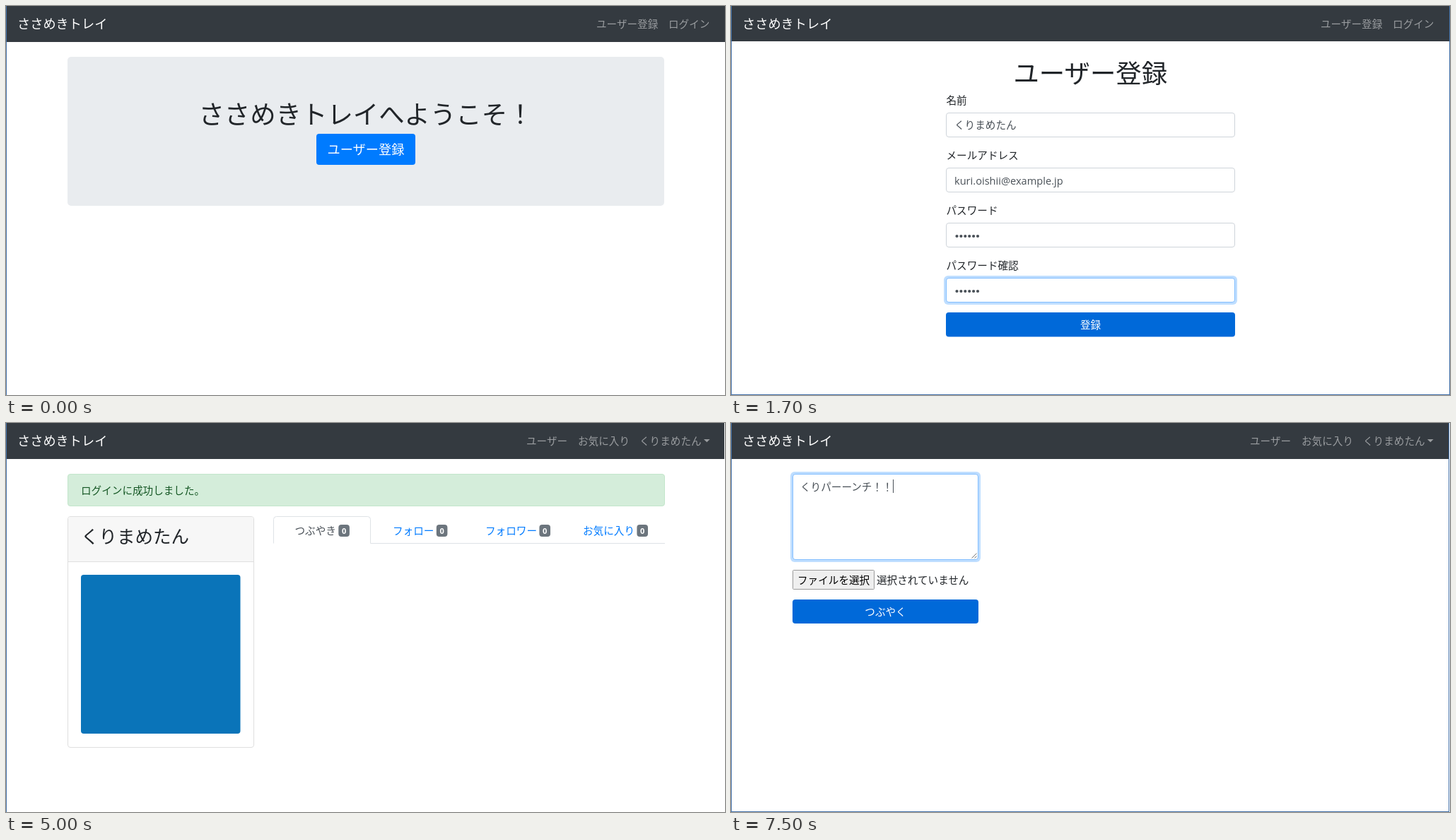
An HTML page that plays this animation: 1017x551 px, repeating every 8000 ms.

```html
<!DOCTYPE html>
<html lang="ja">
<head>
<meta charset="utf-8">
<title>ささめきトレイ</title>
<style>
  html, body { margin: 0; width: 100%; height: 100%; overflow: hidden; background: #fff; }
  svg { display: block; width: 1017px; height: 551px; }
  text { font-family: "Noto Sans CJK JP", "Noto Sans CJK", sans-serif; font-weight: 350; white-space: pre; }
  .latin { font-family: "Open Sans", "Noto Sans", sans-serif; font-weight: 400; }
  .bold { font-weight: 700; }
</style>
</head>
<body>
<svg id="stage" viewBox="0 0 1017 551" xmlns="http://www.w3.org/2000/svg"></svg>
<script>
const APP = 'ささめきトレイ';
const USER = 'くりまめたん';
const MAIL = 'kuri.oishii@example.jp';
const BASE = 14.6, TITLE = 36.4;
const INK = '#212529', GRAY = '#495057', LINK = '#007bff', MUTED = '#999c9f', EDGE = '#4472aa';

const stage = document.getElementById('stage');
let layer;

function add(tag, attrs, content) {
  const node = document.createElementNS(stage.namespaceURI, tag);
  for (const key in attrs) node.setAttribute(key, attrs[key]);
  if (content) node.textContent = content;
  layer.appendChild(node);
  return node;
}

// Full-width text, placed by the middle of its line
function text(x, mid, content, fill = INK, size = BASE, anchor = 'start') {
  add('text', { x, y: mid + size * 0.38, fill, 'font-size': size, 'text-anchor': anchor }, content);
}

const centered = (x, mid, content, fill, size) => text(x, mid, content, fill, size, 'middle');
const path = (d, attrs) => add('path', { d, fill: 'none', ...attrs });

function box(x, y, width, height, fill, rx = 0) {
  add('rect', { x, y, width, height, fill, rx });
}

function frame(x, y, width, height, fill, stroke, rx = 3.5) {
  add('rect', { x: x + 0.5, y: y + 0.5, width: width - 1, height: height - 1, fill, stroke, rx });
}

function field(x, y, width, height, focused) {
  if (focused) box(x - 3, y - 3, width + 6, height + 6, '#bfdeff', 6);
  frame(x, y, width, height, '#fff', focused ? '#80bdff' : '#ced4da');
}

function button(x, y, width, height, label, fill = '#0069d9', size = BASE) {
  box(x, y, width, height, fill, 4);
  centered(x + width / 2, y + height / 2, label, '#fff', size);
}

function dots(x, y) {
  for (let i = 0; i < 6; i++) add('circle', { cx: x + i * 5.9, cy: y, r: 2.1, fill: GRAY });
}

function mail(x, y) {
  add('text', { x, y, fill: GRAY, 'font-size': BASE, class: 'latin' }, MAIL);
}

function alertBar(width, message) {
  frame(87, 72, width, 46, '#d4edda', '#c3e6cb');
  text(106, 95, message, '#155724');
}

function navbar(right, height, links) {
  box(0, 0, 1, 551, EDGE);
  box(1, 0, right - 1, height, '#343a40');
  const mid = height / 2;
  text(16, mid, APP, '#fff', 18.2);
  for (const [x, label] of links) text(x, mid, label, MUTED);
}

function guestNav(right, height, x) {
  navbar(right, height, [[x, 'ユーザー登録'], [x + 102, 'ログイン']]);
}

function memberNav(right, x) {
  navbar(right, 51, [[x, 'ユーザー'], [x + 73, 'お気に入り'], [x + 160, USER]]);
  path(`M${x + 251} 23h8.6l-4.3 4.3z`, { fill: MUTED });
}

function windowEdge(x) {
  box(x, 0, 1, 551, EDGE);
  box(0, 550, x + 1, 1, EDGE);
}

function welcome() {
  guestNav(1017, 51, 835);
  box(87, 72, 844, 211, '#e9ecef', 5);
  centered(509, 153, APP + 'へようこそ！', INK, TITLE);
  button(439, 181, 140, 44, 'ユーザー登録', LINK, 18.2);
}

function register() {
  guestNav(1016, 50, 834);
  windowEdge(1016);
  centered(508.3, 95, 'ユーザー登録', INK, TITLE);
  ['名前', 'メールアドレス', 'パスワード', 'パスワード確認'].forEach((label, i) => {
    const y = 133 + i * 78;
    text(304.5, y, label);
    field(304, y + 18, 409, 35, i === 3);
  });
  text(316, 168.5, USER, GRAY);
  mail(316, 253);
  dots(319.5, 326);
  dots(319.5, 404);
  button(304, 434, 409, 34.5, '登録');
}

function login() {
  guestNav(1017, 51, 835);
  alertBar(844, 'ユーザを登録しました。');
  centered(509, 155, 'ログイン', INK, TITLE);
  text(305, 194, 'メールアドレス');
  field(304.5, 212, 409, 35);
  mail(316.5, 235.5);
  text(305, 272, 'パスワード');
  field(304.5, 290, 409, 35, true);
  dots(320, 309);
  button(304.5, 339, 409, 34.5, 'ログイン');
  text(305, 384, '未登録の場合');
  text(396, 384, 'ユーザー登録へ！', LINK);
}

function tab(x, label, fill) {
  text(x, 152, label, fill);
  const left = x + label.length * BASE + 3.4;
  box(left, 144, 15.6, 17, '#6c757d', 4);
  add('text', {
    x: left + 7.8, y: 156.8, fill: '#fff', 'font-size': 11,
    'text-anchor': 'middle', class: 'latin bold'
  }, '0');
}

function profile() {
  memberNav(1016, 736);
  alertBar(845, 'ログインに成功しました。');
  frame(87, 132, 264, 328, '#fff', '#dfdfdf');
  path('M88 196V136a3 3 0 0 1 3-3H347a3 3 0 0 1 3 3V196z', { fill: '#f7f7f7' });
  box(88, 196, 262, 1, '#dfdfdf');
  text(106, 160, USER, INK, 25.5);
  box(106, 215, 225.5, 225, '#0a74b9', 4);
  path('M378.5 170.5V136.5a4 4 0 0 1 4-4H511.5a4 4 0 0 1 4 4V170.5H932', { stroke: '#dee2e6' });
  tab(408.5, 'つぶやき', GRAY);
  tab(547, 'フォロー', LINK);
  tab(678, 'フォロワー', LINK);
  tab(816, 'お気に入り', LINK);
}

function compose() {
  memberNav(1015, 734);
  windowEdge(1015);
  field(87, 72, 263, 122, true);
  text(98, 90, 'くりパーーンチ！！', GRAY);
  box(229, 80, 1, 19, GRAY);
  path('M340.5 191.5l7-7M344.5 191.5l3-3', { stroke: '#777' });
  frame(87, 208, 116, 28, '#efefef', '#9a9a9a', 1);
  text(94, 222, 'ファイルを選択', '#000');
  text(206, 222, '選択されていません');
  button(87, 250, 263, 34, 'つぶやく');
}

const LOOP = 8000;
const scenes = [[0, welcome], [500, register], [2500, login], [5000, profile], [7500, compose]]
  .map(([start, draw]) => {
    layer = stage;
    const group = add('g', { display: 'none' });
    layer = group;
    draw();
    return { start, group };
  });

let shown;
function render(time) {
  const t = time % LOOP;
  const next = scenes.filter(scene => scene.start <= t).pop();
  if (next === shown) return;
  if (shown) shown.group.setAttribute('display', 'none');
  next.group.removeAttribute('display');
  shown = next;
}

const began = performance.now();
function tick() {
  render(performance.now() - began);
  requestAnimationFrame(tick);
}
tick();
</script>
</body>
</html>
```
